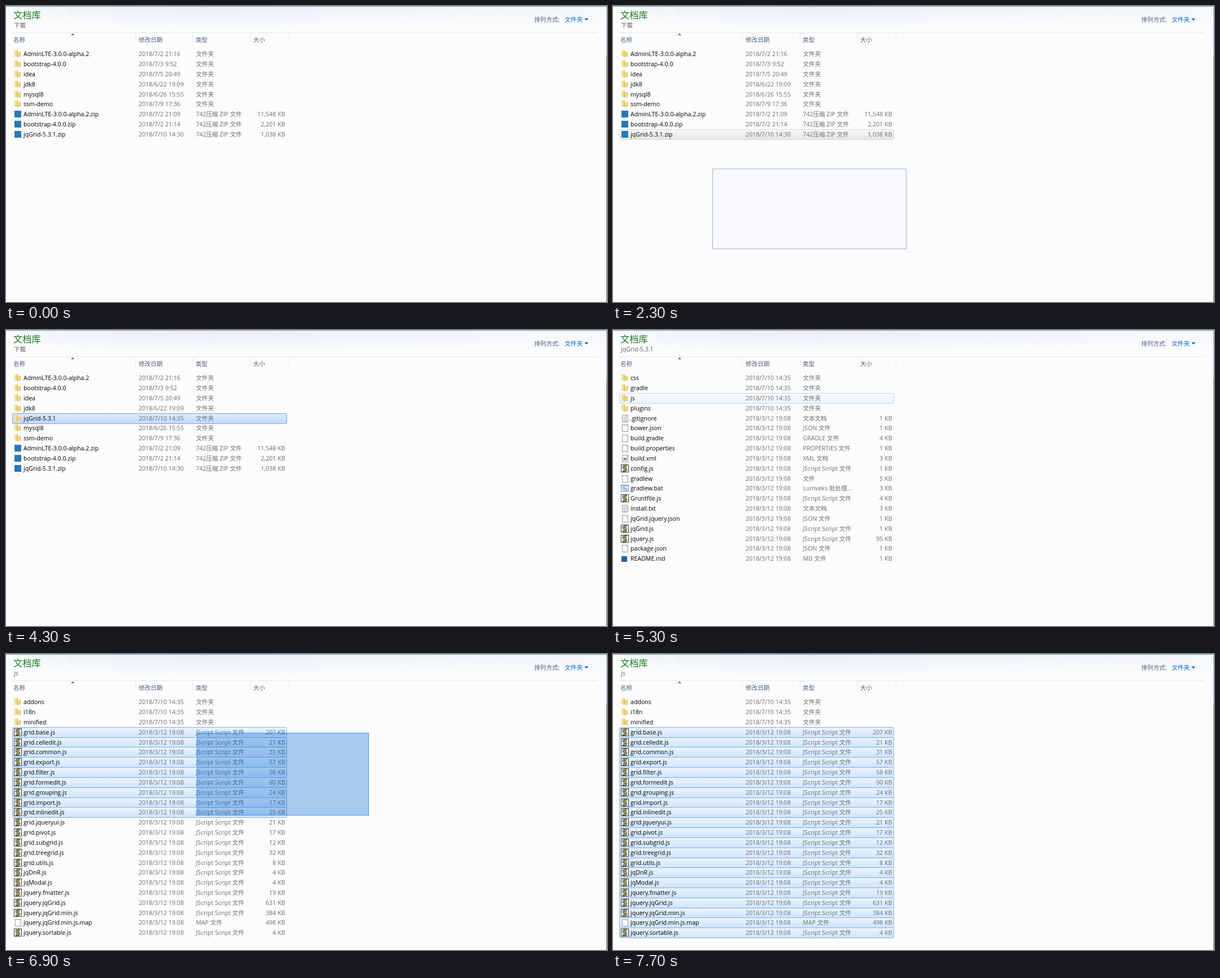
An HTML page with a canvas for the animation above (8 s loop, 1065 px wide and 526 px high).

```html
<!DOCTYPE html>
<html lang="zh-CN">
<head>
<meta charset="utf-8">
<style>
  html, body { margin: 0; width: 100%; height: 100%; overflow: hidden; background: #fcfcfc; }
  canvas { display: block; }
</style>
</head>
<body>
<canvas id="stage" width="1065" height="526"></canvas>
<script>
const ctx = document.getElementById('stage').getContext('2d');
const FAMILY = '"Open Sans", "Noto Sans CJK SC", "Noto Sans CJK", sans-serif';
const LOOP = 8000, ROW = 17.826;
const GREY = '#6d6d6d', HEAD = '#4c607a', INK = '#000';

// Row and menu highlights: top colour, bottom colour, border
const HOVER = ['#fafbfd', '#ebf3fd', '#b8d6fb'];
const SELECTED = ['#ebf4fe', '#cfe4fe', '#84acdd'];
const ACTIVE = ['#dcebfc', '#c1dbfc', '#7da2ce'];
const INACTIVE = ['#f8f8f8', '#e5e5e5', '#d9d9d9'];
const MENU_HOVER = ['#f3f7fc', '#e8f0fa', '#aecff7'];

const TYPES = {
  zip: ['742压缩 ZIP 文件', 'archive'],
  js: ['JScript Script 文件', 'script'],
  json: ['JSON 文件', 'page'],
  gradle: ['GRADLE 文件', 'page'],
  properties: ['PROPERTIES 文件', 'page'],
  map: ['MAP 文件', 'page'],
  xml: ['XML 文档', 'xml'],
  txt: ['文本文档', 'text'],
  gitignore: ['文本文档', 'text'],
  bat: ['Lumveks 批处理...', 'batch'],
  md: ['MD 文件', 'doc'],
};

// Each line: name, size in KB, date; a trailing slash marks a folder
function parse(listing) {
  return listing.trim().split('\n').map(line => {
    const [path, size, date] = line.trim().split('|');
    const folder = path.endsWith('/');
    const name = path.replace('/', '');
    const [type, icon] = folder ? ['文件夹', 'folder'] : TYPES[name.split('.').pop()] || ['文件', 'page'];
    return { name, type, icon, size: size ? size + ' KB' : '', date: date || (folder ? '2018/7/10 14:35' : '2018/3/12 19:08') };
  });
}

const downloads = parse(`
  AdminLTE-3.0.0-alpha.2/||2018/7/2 21:16
  bootstrap-4.0.0/||2018/7/3 9:52
  idea/||2018/7/5 20:49
  jdk8/||2018/6/22 19:09
  mysql8/||2018/6/26 15:55
  ssm-demo/||2018/7/9 17:36
  AdminLTE-3.0.0-alpha.2.zip|11,548|2018/7/2 21:09
  bootstrap-4.0.0.zip|2,201|2018/7/2 21:14
  jqGrid-5.3.1.zip|1,038|2018/7/10 14:30`);
const extracted = [...downloads.slice(0, 4), ...parse('jqGrid-5.3.1/'), ...downloads.slice(4)];
const project = parse(`
  css/
  gradle/
  js/
  plugins/
  .gitignore|1
  bower.json|1
  build.gradle|4
  build.properties|1
  build.xml|3
  config.js|1
  gradlew|5
  gradlew.bat|3
  Gruntfile.js|4
  install.txt|3
  jqGrid.jquery.json|1
  jqGrid.js|1
  jquery.js|95
  package.json|1
  README.md|1`);
const scripts = parse(`
  addons/
  i18n/
  minified/
  grid.base.js|207
  grid.celledit.js|21
  grid.common.js|31
  grid.export.js|57
  grid.filter.js|58
  grid.formedit.js|90
  grid.grouping.js|24
  grid.import.js|17
  grid.inlinedit.js|25
  grid.jqueryui.js|21
  grid.pivot.js|17
  grid.subgrid.js|12
  grid.treegrid.js|32
  grid.utils.js|8
  jqDnR.js|4
  jqModal.js|4
  jquery.fmatter.js|19
  jquery.jqGrid.js|631
  jquery.jqGrid.min.js|384
  jquery.jqGrid.min.js.map|498
  jquery.sortable.js|4`);

// Menu entries: label, icon colour, submenu; null is a separator
const MENU = [
  ['打开(O)'], ['用记事本打开'], ['管理员取得所有权'], null,
  ['用742压缩打开(Q)', '#2878b5'], ['解压到(F)...', '#2878b5'],
  ['解压到当前文件夹(X)', '#2878b5'], ['解压到 jqGrid-5.3.1\\ (E)', '#2878b5'], null,
  ['Edit with Notepad++', '#9bc55a'], ['打开方式(H)', '', true], null,
  ['共享(H)', '', true], null,
  ['TortoiseSVN', '#71849a', true], null,
  ['上传到禾舟网盘', '#2d9be5'], null,
  ['还原以前的版本(V)'], null,
  ['发送到(N)', '', true],
];

// State changes, applied in order
const TIMELINE = [
  [0, { rows: downloads, path: '下载', hover: -1, from: -1, to: -1, menu: null, busy: false }],
  [100, { hover: 8 }],
  [700, { from: 8, to: 8 }],
  [900, { menu: -1 }],
  [1100, { menu: 0 }],
  [1200, { menu: 2 }],
  [1300, { menu: 4 }],
  [1400, { menu: 5 }],
  [1600, { menu: 6 }],
  [2000, { menu: null, busy: true }],
  [3000, { busy: false }],
  [3600, { rows: extracted, from: 9, to: 9, hover: 9 }],
  [3700, { hover: 5 }],
  [4000, { hover: 4 }],
  [4200, { from: 4, to: 4 }],
  [4400, { rows: [], path: 'jqGrid-5.3.1', hover: -1, from: -1, to: -1 }],
  [4500, { rows: project, hover: 4 }],
  [4800, { hover: 1 }],
  [5200, { hover: 0 }],
  [5300, { hover: 2 }],
  [5600, { from: 2, to: 2 }],
  [5800, { rows: [], path: 'js', hover: -1, from: -1, to: -1 }],
  [5900, { rows: scripts, hover: 2 }],
  [6100, { hover: -1 }],
  [7600, { from: 3, to: 23, hover: 21 }],
  [7700, { hover: -1 }],
];

// Pointer positions while dragging, one every 100 ms
const DRAG_START = 6800;
const DRAG = [[430, 205], [338, 287], [290, 370], [262, 440], [250, 500], [250, 519], [255, 519], [270, 495]];

const rowTop = i => Math.round(76.3 + ROW * i);

function rect(x, y, w, h, fill) {
  ctx.fillStyle = fill;
  ctx.fillRect(x, y, w, h);
}

function frame(x, y, w, h, fill, stroke) {
  rect(x, y, w, h, fill);
  ctx.strokeStyle = stroke;
  ctx.lineWidth = 1;
  ctx.strokeRect(x + .5, y + .5, w - 1, h - 1);
}

function poly(fill, ...points) {
  ctx.fillStyle = fill;
  ctx.beginPath();
  points.forEach(([x, y]) => ctx.lineTo(x, y));
  ctx.fill();
}

function text(label, x, y, color, { size = 10.6, align = 'left', weight = 400 } = {}) {
  ctx.font = `${weight} ${size}px ${FAMILY}`;
  ctx.textAlign = align;
  ctx.fillStyle = color;
  ctx.fillText(label, x, y);
}

function vertical(y, h, top, bottom) {
  const g = ctx.createLinearGradient(0, y, 0, y + h);
  g.addColorStop(0, top);
  g.addColorStop(1, bottom);
  return g;
}

function highlight(x, y, w, h, [top, bottom, border]) {
  ctx.beginPath();
  ctx.roundRect(x + .5, y + .5, w - 1, h - 1, 2);
  ctx.fillStyle = vertical(y, h, top, bottom);
  ctx.fill();
  ctx.strokeStyle = border;
  ctx.lineWidth = 1;
  ctx.stroke();
}

function sheet(y) {
  frame(16, y - 6, 11, 13, '#fdfdfd', '#9a9a9a');
  poly('#d5d5d5', [23, y - 6], [27, y - 2], [23, y - 2]);
}

// Icons are centred on y
const ICONS = {
  folder(y) {
    poly('#f3df95', [15, y - 6], [21, y - 7], [21, y + 5], [15, y + 5]);
    poly('#e2c15c', [19, y - 5], [21, y - 6], [21, y + 6], [19, y + 5]);
    poly('#f0d985', [21, y - 3], [26, y - 4], [26, y + 5], [21, y + 6]);
    poly('#cfae54', [25, y - 3], [26, y - 4], [26, y + 5], [25, y + 5]);
  },
  archive(y) { rect(15, y - 6, 12, 12, '#2878b5'); },
  page: sheet,
  text(y) {
    sheet(y);
    for (let dy = -3; dy < 6; dy += 2) rect(18, y + dy, 7, 1, '#b3bcc4');
  },
  xml(y) {
    sheet(y);
    rect(18, y - 1, 7, 5, '#8eb4cf');
    rect(20, y, 2, 2, '#477d59');
  },
  batch(y) {
    frame(14, y - 6, 14, 12, '#e9f0f6', '#7390aa');
    rect(15, y - 5, 12, 2, '#abc4da');
    ctx.strokeStyle = '#6d8eaa';
    for (const [x, dy] of [[19, 0], [23, 2]]) {
      ctx.beginPath();
      ctx.arc(x, y + dy, 2, 0, 7);
      ctx.stroke();
    }
  },
  doc(y) { rect(15, y - 4, 10, 10, '#2462a4'); },
  script(y) {
    frame(14, y - 7, 14, 14, '#fff', '#333');
    for (const [color, width] of [['#222', 3.4], ['#ddd766', 1.4]]) {
      ctx.strokeStyle = color;
      ctx.lineWidth = width;
      ctx.beginPath();
      ctx.moveTo(24.5, y - 4);
      ctx.bezierCurveTo(16, y - 5, 18, y - 1, 21, y);
      ctx.bezierCurveTo(25, y + 1, 24, y + 5, 17, y + 4);
      ctx.stroke();
    }
  },
};

function drawHeader(path) {
  rect(0, 0, 1065, 526, '#fcfcfc');
  const glow = ctx.createLinearGradient(0, 0, 1065, 0);
  [[0, 0], [.06, .25], [.2, .6], [.38, .7], [.6, .45], [1, .25]]
    .forEach(([at, alpha]) => glow.addColorStop(at, `rgba(222,231,246,${alpha})`));
  rect(0, 1, 1065, 46, glow);
  for (const [x, w] of [[70, 18], [105, 30], [185, 45], [300, 75]])
    poly('rgba(214,225,243,.15)', [x, 1], [x + w, 1], [x + w + 22, 38], [x + 22, 38]);
  rect(0, 1, 1065, 46, vertical(1, 38, 'rgba(252,252,252,0)', '#fcfcfc'));
  rect(0, 0, 1065, 1, '#8ba0bd');
  rect(0, 1, 1065, 1, '#d4dfed');
  rect(11, 47, 1037, 1, '#dfe9f4');
  rect(1064, 0, 1, 526, '#62666c');
  rect(1064, 0, 1, 88, '#8ba0bd');

  text('文档库', 13, 22, '#187a20', { size: 16.3 });
  text(path, 14, 38, '#58616b');
  text('排列方式:', 936, 28, HEAD);
  text('文件夹', 990, 28, '#0066cc');
  poly('#0066cc', [1025, 22], [1032, 22], [1028.5, 26]);
  poly('#4b7898', [115, 52], [118, 48.5], [121, 52]);
  [[13, '名称'], [235, '修改日期'], [336, '类型'], [438, '大小']]
    .forEach(([x, label]) => text(label, x, 63.5, HEAD));
  for (const x of [229, 331, 433, 501]) rect(x, 48, 1, 17, '#e1e8f0');
}

function drawRow(row, i, { hover, from, to, busy }) {
  const selected = i >= from && i <= to;
  if (selected || hover === i) {
    const style = !selected ? HOVER : busy ? INACTIVE : hover === i ? ACTIVE : SELECTED;
    highlight(11, rowTop(i), 487, 19, style);
  }
  const middle = 85.3 + ROW * i, base = middle + 4;
  ICONS[row.icon](Math.round(middle));
  text(row.name, 31, base, INK);
  text(row.date, 235, base, GREY);
  text(row.type, 336.5, base, GREY);
  text(row.size, 494.5, base, GREY, { align: 'right' });
}

function drawMenu(active) {
  rect(202, 230, 188, 300, 'rgba(0,0,0,.3)');
  frame(198, 226, 190, 310, '#f0f0f0', '#979797');
  rect(224, 229, 1, 300, '#e6e7e7');
  rect(225, 229, 1, 300, '#fafafa');
  let top = 228;
  const enabled = MENU[active];
  MENU.forEach((entry, index) => {
    if (!entry) {
      rect(226, Math.round(top + 3), 158, 1, '#dedede');
      rect(226, Math.round(top + 4), 158, 1, '#fff');
      top += 7;
      return;
    }
    const [label, color, submenu] = entry, middle = top + 9.4;
    if (entry === enabled) highlight(201, Math.round(top), 184, 19, MENU_HOVER);
    if (color) rect(205, Math.round(middle) - 6, 13, 12, color);
    text(label, 229, middle + 4, INK, { weight: index ? 400 : 700 });
    if (submenu) poly(INK, [374, middle - 3], [377.5, middle], [374, middle + 3]);
    top += 18.6;
  });
}

function draw(t) {
  const state = {};
  for (const [start, change] of TIMELINE) if (t >= start) Object.assign(state, change);
  const pointer = DRAG[Math.floor((t - DRAG_START) / 100)];
  if (pointer) {
    state.from = 3;
    state.to = state.rows.findLastIndex((_, i) => rowTop(i) < pointer[1]);
  }

  drawHeader(state.path);
  state.rows.forEach((row, i) => drawRow(row, i, state));
  if (pointer) frame(pointer[0], 140, 643 - pointer[0], pointer[1] - 140, 'rgba(0,102,204,.33)', '#3399ff');
  if (state.menu !== null) drawMenu(state.menu);
  if (state.busy) frame(176, 289, 344, 143, '#f7f9fc', '#9fb3c9');
}

const begin = performance.now();
function tick() {
  draw((performance.now() - begin) % LOOP);
  requestAnimationFrame(tick);
}
tick();
</script>
</body>
</html>
```
